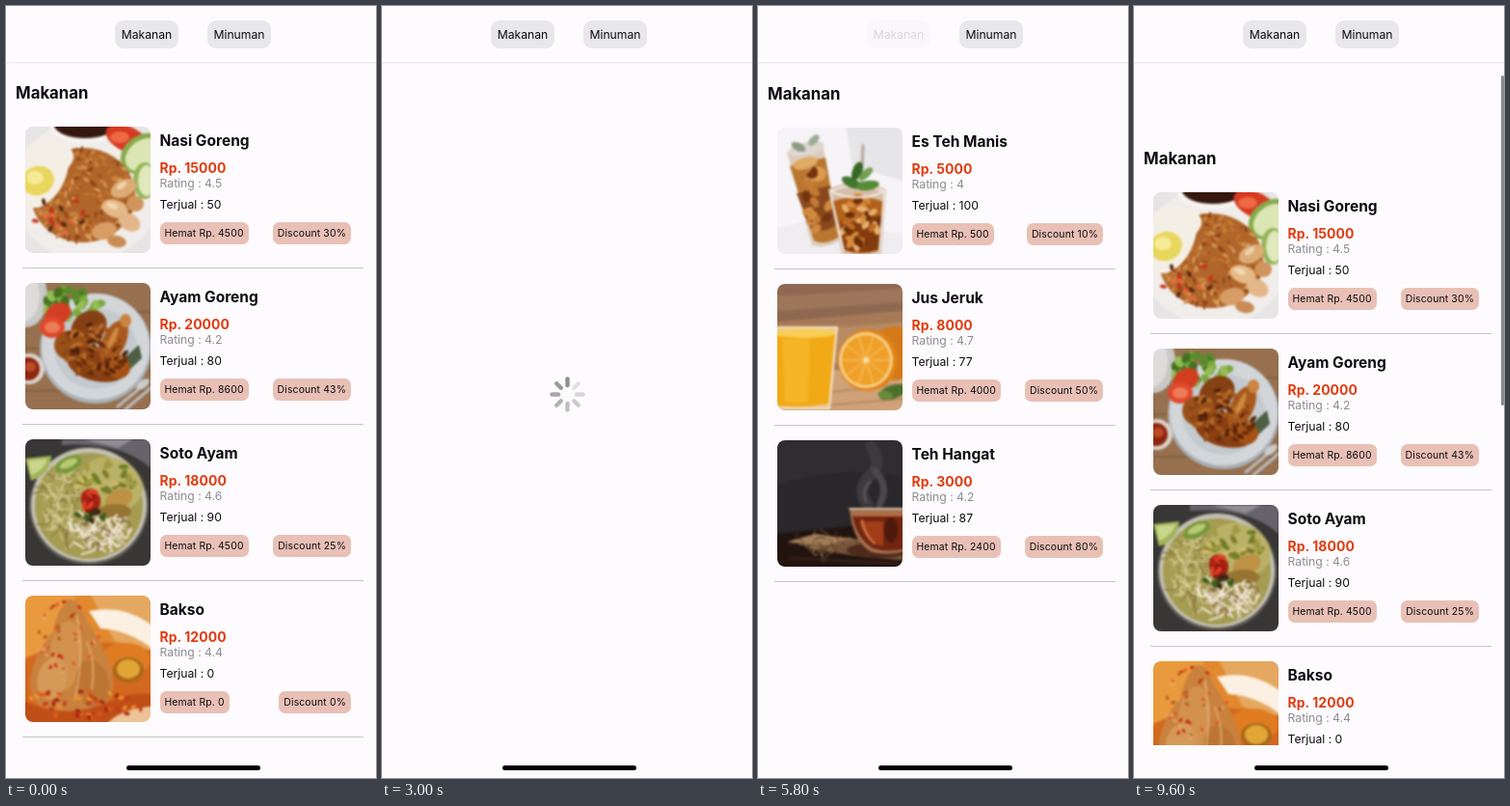
Animation, 384 px wide and 800 px high, one loop 9700 ms. Source, as an HTML page:

```html
<!DOCTYPE html>
<html lang="id">
<head>
<meta charset="utf-8">
<title>Menu</title>
<style>
  html, body { margin: 0; width: 100%; height: 100%; overflow: hidden; background: #fdfbfe; }
  #stage {
    position: relative; width: 384px; height: 800px; overflow: hidden;
    background: #fdfbfe; color: #0d0d0f;
    font: 12.2px/20px Inter, "Liberation Sans", sans-serif;
    font-optical-sizing: none; white-space: nowrap;
  }
  #stage * { position: absolute; }
  header { left: 0; top: 0; width: 384px; height: 58px; border-bottom: 1px solid #efedf0; box-shadow: 0 1px 1px #f4f3f5; }
  .tab { top: 14.5px; width: 66px; height: 29.5px; line-height: 29.5px; border-radius: 9px; background: #e8e7e9; text-align: center; }
  #food { left: 113px; }
  #drink { left: 209px; }
  #view { left: 0; top: 64px; width: 384px; height: 702px; overflow: hidden; }
  #title { left: 10px; top: 16px; font-size: 16.8px; font-weight: 700; }
  .list { left: 0; top: 0; width: 384px; }
  .row { left: 0; width: 384px; height: 162px; }
  .photo { left: 20px; top: 0; width: 130px; height: 131px; border-radius: 8px; overflow: hidden; }
  .photo g { filter: blur(.8px); }
  .row span { left: 159.5px; }
  .row .name { top: 5px; font-size: 15.5px; font-weight: 700; }
  .row .price { top: 33px; font-size: 13.9px; font-weight: 700; letter-spacing: .1px; color: #e03c10; }
  .row .rating { top: 49px; color: #8d8c90; }
  .row .sold { top: 71px; }
  .row .badge {
    top: 99px; height: 23px; line-height: 23px; padding: 0 5px; border-radius: 6.5px;
    background: #e9c0b6; font-size: 10.4px; letter-spacing: .15px;
  }
  .row .off { left: auto; right: 26px; }
  .row hr { left: 17px; top: 146px; width: 354px; height: 1px; margin: 0; border: 0; background: #c6c5c8; }
  #bar { left: 381px; width: 3px; border-radius: 2px; background: #8b8a8e; }
  #spin { left: 174px; top: 384px; width: 37px; height: 37px; }
  #home { left: 125px; top: 787px; width: 138.5px; height: 5px; border-radius: 3px; background: #000; }
</style>
</head>
<body>
<div id="stage">
  <header></header>
  <div class="tab" id="food">Makanan</div>
  <div class="tab" id="drink">Minuman</div>
  <div id="view">
    <div class="list" id="foods"></div>
    <div class="list" id="drinks"></div>
    <div id="title"></div>
  </div>
  <div id="bar"></div>
  <svg id="spin" viewBox="-18.5 -18.5 37 37"></svg>
  <div id="home"></div>
</div>
<script>
const $ = id => document.getElementById(id);
const LOOP = 9700, PITCH = 161.75, MAX_SCROLL = 476;

// Drawing helpers
let seed = 1;
const rnd = () => (seed = seed * 16807 % 2147483647) / 2147483647;
const fill = c => `<rect x="-9" y="-9" width="148" height="149" fill="${c}"/>`;
const oval = (x, y, rx, ry, c, rot = 0) =>
  `<ellipse cx="${x}" cy="${y}" rx="${rx}" ry="${ry}" fill="${c}" transform="rotate(${rot} ${x} ${y})"/>`;
const shape = (d, c) => `<path d="${d}" fill="${c}"/>`;
const line = (d, c, w = 1) => `<path d="${d}" fill="none" stroke="${c}" stroke-width="${w}" stroke-linecap="round"/>`;

function scatter(n, x, y, rx, ry, draw) {
  let out = '';
  for (let i = 0; i < n; i++) {
    const a = rnd() * 6.283, r = Math.sqrt(rnd());
    out += draw(x + Math.cos(a) * r * rx, y + Math.sin(a) * r * ry, i);
  }
  return out;
}
const bits = (n, x, y, rx, ry, w, h, colors) => scatter(n, x, y, rx, ry, (px, py, i) =>
  oval(px.toFixed(1), py.toFixed(1), w, h, colors[i % colors.length], Math.round(rnd() * 180)));
const strands = (n, x, y, rx, ry, len, colors, w) => scatter(n, x, y, rx, ry, (px, py, i) => {
  const j = () => ((rnd() - .5) * 2 * len).toFixed(1);
  return line(`M${px.toFixed(1)} ${py.toFixed(1)}q${j()} ${j()} ${j()} ${j()}`, colors[i % colors.length], w);
});

const photos = {
  friedRice: () => fill('#e6e4e5') +
    oval(64, 66, 78, 72, '#f1edea') +
    oval(62, 0, 37, 17, '#f7f3f0') + oval(62, -2, 32, 14, '#35170f') +
    oval(106, 13, 24, 13, '#d63a20', 25) + oval(98, 11, 10, 6, '#ee6a44') +
    oval(122, 28, 25, 19, '#86ab4b', -35) + oval(123, 29, 21, 15, '#dbe6b4', -35) +
    oval(124, 56, 12, 19, '#93b458') + oval(126, 56, 9, 16, '#e0e9bd') +
    oval(60, 71, 54, 49, '#b0662b') +
    bits(200, 60, 71, 53, 48, 3.4, 1.3, ['#d08a45', '#8d4115', '#c4762e', '#dca25e', '#a5521b']) +
    shape('M0 22Q20 8 44 20Q56 30 45 42Q38 74 14 84L-4 84Z', '#f4efe5') +
    oval(13, 56, 17, 15, '#e9d65c', -20) + oval(10, 53, 9, 7, '#f6ea96') +
    oval(102, 64, 14, 9, '#dcab76', -25) + oval(93, 85, 14, 9, '#e5ba89', 20) +
    oval(82, 108, 13, 9, '#d79d64', -15) + oval(108, 99, 12, 9, '#e3b78a', 30) +
    oval(114, 80, 9, 8, '#d0955c') + oval(95, 119, 10, 6, '#c98c55', 10) +
    oval(100, 61, 6, 3, '#f0d1ab', -35) + oval(90, 82, 6, 3, '#f3d8b6', 20) +
    bits(16, 36, 92, 30, 20, 3.5, 2, ['#c93318', '#5b2a12', '#e46b3c']),

  friedChicken: () => fill('#96704f') +
    line('M0 30H130M0 68H130M0 112H130', '#84603f', 2) +
    oval(1, 14, 22, 32, '#c9c8c6') + oval(-2, 13, 17, 27, '#dddcda') +
    oval(73, 68, 58, 57, '#aab0b5') + oval(73, 66, 56, 55, '#d2d6d9') + oval(73, 68, 43, 42, '#c3c9cd') +
    bits(40, 48, 21, 30, 14, 6, 4, ['#5b8a2c', '#7ba83c', '#44711f', '#94bd55']) +
    oval(34, 32, 14, 11, '#d33e22', -30) + oval(28, 46, 13, 11, '#e0492b') + oval(28, 46, 8, 6, '#ec7b57') +
    shape('M92 88L118 64L121 78L104 94Z', '#4c5f43') +
    oval(66, 46, 20, 16, '#854014', -40) + oval(48, 65, 18, 16, '#9a5019', 10) +
    oval(75, 84, 32, 18, '#8a3f11', 12) + oval(92, 61, 12, 24, '#a9591d', 25) +
    oval(104, 39, 6, 7, '#c98541') + oval(97, 88, 12, 11, '#a65217') +
    bits(90, 72, 70, 34, 27, 4, 2, ['#b86c2b', '#6a2c09', '#a3581d', '#8a4414', '#4f2008']) +
    oval(91, 57, 3, 12, '#cf8a42', 25) +
    oval(4, 89, 16, 16, '#dad2cb') + oval(3, 89, 12, 12, '#8f2812') + oval(5, 87, 6, 5, '#bc4a25') +
    line('M96 128L125 104M104 131L130 109', '#b9bbbc', 3) + oval(122, 105, 8, 4, '#c9cbcc', -38),

  soto: () => fill('#393735') +
    shape('M38 0H130V30Q100 2 38 6Z', '#66646a') + shape('M60 0H112L96 9Z', '#8f8d91') +
    oval(66, 69, 62, 61, '#5f5c55') + oval(66, 68, 60, 59, '#c2c0b3') + oval(66, 69, 56, 55, '#a59c52') +
    oval(90, 46, 33, 26, '#b9b166', 25) +
    strands(90, 39, 66, 24, 32, 13, ['#d0c88a', '#b5aa62', '#ddd3a2', '#8a7a3c'], 1.3) +
    bits(30, 82, 43, 32, 20, 5, 2.5, ['#6f7d28', '#a29a42', '#cdb965', '#7d7b2b']) +
    oval(97, 62, 15, 10, '#bd9245', -25) + oval(93, 75, 17, 8, '#967431') +
    strands(70, 78, 98, 35, 17, 14, ['#eee3d1', '#d0bf9f', '#f4ecde', '#8d7245'], 1.8) +
    oval(68, 63, 10, 12, '#a92315', -20) + bits(9, 69, 63, 10, 12, 5, 2.5, ['#dd3f25', '#8f160d']) +
    bits(12, 68, 79, 14, 5, 4, 2, ['#375a1c', '#3a2a16']) +
    shape('M0 20L27 17Q26 36 6 43Z', '#a0b556') + shape('M3 22L23 20Q20 32 6 37Z', '#c9d58b') +
    oval(45, 26, 15, 8, '#78973b', -25) + oval(45, 25, 10, 4, '#b9c974', -25),

  meatball: () => fill('#e2892f') +
    shape('M-9 -9H58L22 58L-9 70Z', '#e99a3d') + shape('M64 -9H140V64L92 46Z', '#e5a860') +
    shape('M66 16Q108 8 140 38V62Q112 36 78 34Z', '#fbf0e2') +
    shape('M0 65Q62 34 140 60V140H-9Z', '#d2691f') +
    oval(104, 66, 26, 17, '#df7c22') + oval(107, 77, 16, 13, '#a9681a') + oval(107, 76, 12, 10, '#e2a636') +
    shape('M45 4Q57 4 64 27Q84 52 91 84Q94 119 56 125Q12 128 5 95Q6 62 29 38Q32 15 45 4Z', '#c9823e') +
    oval(42, 62, 17, 36, '#d2924e', 6) + oval(70, 92, 17, 26, '#bd7534', -12) + oval(28, 86, 15, 22, '#d69a58', 14) +
    line('M53 18Q62 60 52 106M64 48Q74 72 69 97', '#dfae73', 1.5) +
    shape('M-9 105Q40 133 92 108Q118 96 140 106V140H-9Z', '#c04e17') +
    shape('M80 140Q92 116 140 114V140Z', '#eec39a') +
    bits(40, 43, 42, 34, 37, 2.4, 1.5, ['#c52c12', '#df5a24', '#b3571f', '#e6a561']) +
    bits(45, 62, 112, 62, 16, 3, 1.8, ['#d95c1c', '#a8250c', '#ef9130', '#c43a14']),

  satay: () => fill('#3f543c') +
    [...Array(24)].map((_, i) => line(`M${i * 11 - 125} 135L${i * 11 - 10} -5`, i % 2 ? '#5d7451' : '#2a3f2b', i % 3 + 1.5)).join('') +
    shape('M-9 98Q30 115 46 140H-9Z', '#d2d4d2') + shape('M100 -9H140V26Z', '#78906a') +
    line('M74 72L130 86M70 79L130 98M63 86L125 113M50 94L105 124M43 99L80 126', '#bfa06a', 2) +
    oval(52, 57, 45, 24, '#5f2b1c', 13) + oval(62, 41, 36, 20, '#6c3421', 18) +
    oval(38, 76, 29, 17, '#522519', 12) + oval(85, 68, 25, 13, '#693120', 12) +
    bits(220, 58, 57, 47, 31, 2.8, 1.8, ['#94513a', '#42190f', '#7a3724', '#b0745a', '#612819']) +
    oval(31, 96, 12, 6, '#8a7a42', 15) + oval(68, 95, 11, 6, '#998046', 12),

  noodles: () => fill('#eeeae7') +
    line('M66 120V131', '#c08a60', 25) + oval(65, 64, 65, 65, '#b08a6c') +
    oval(65, 62, 63, 62, '#857362') + oval(65, 64, 57, 57, '#63493a') + oval(66, 68, 53, 52, '#7c431c') +
    strands(210, 66, 67, 49, 47, 17, ['#b26c2d', '#693211', '#cb9049', '#985420', '#4a2410'], 1.6) +
    bits(60, 66, 68, 47, 45, 3.5, 2.2, ['#1f3522', '#d7aa6a', '#3b1d0d', '#c58945']) +
    oval(30, 87, 12, 5, '#20391f', 30) + oval(75, 98, 14, 6, '#263e28', -8) +
    oval(94, 49, 10, 5, '#243c25', -48) + oval(53, 43, 9, 4, '#2c472b', 45) +
    shape('M49 126H82L87 140H44Z', '#d2a27e') + line('M53 129H77', '#6d4b37', 3),

  icedTea: () => fill('#f6f4f6') +
    shape('M70 -9H140V58L78 40Z', '#e6e5e8') + shape('M-9 106L40 95L140 112V140H-9Z', '#efedef') +
    shape('M10 25L47 17L66 116Q53 126 36 122Z', '#dccbbc') +
    shape('M13 40L50 31L64 113Q50 123 38 117Z', '#b9762f') +
    shape('M20 68L55 60L62 100Q48 112 34 103Z', '#8a491d') +
    oval(29, 37, 13, 6, '#e1aa65', -15) + oval(41, 48, 10, 8, '#dc9c50') + oval(30, 22, 19, 7, '#ded7cf', -12) +
    bits(16, 42, 75, 14, 32, 6, 4, ['#d08a40', '#74340f', '#c47a33']) +
    oval(22, 20, 8, 4, '#8a9c84', 25) + oval(38, 13, 7, 4, '#9cad95', -45) +
    shape('M53 64Q82 50 113 64L108 131H67Z', '#d6bda7') +
    shape('M56 77Q83 67 111 77L106 127Q87 134 69 127Z', '#b2611c') +
    shape('M65 97L108 91L105 126Q87 132 70 126Z', '#823a0e') +
    bits(40, 85, 97, 20, 27, 5, 3, ['#d68b3b', '#6c2d0b', '#bd6c25', '#e7b06d']) +
    line('M55 66Q83 54 111 66Q84 79 55 66M55 68L69 128M111 68L106 128', '#efe7e1', 2) +
    line('M89 19L87 59', '#b9a798', 3) +
    oval(77, 57, 11, 5, '#41762e', 25) + oval(94, 60, 12, 5, '#568c38', -8) +
    oval(83, 45, 5, 10, '#386924', 22) + oval(92, 48, 4, 9, '#71a050', 48),

  orangeJuice: () => fill('#a77a57') +
    shape('M-9 -9H140V27L-9 40Z', '#8e6850') + shape('M-9 13L140 4V18L-9 29Z', '#9d765c') +
    shape('M-9 50L140 39V74L-9 90Z', '#b88a64') + shape('M-9 94L140 84V140H-9Z', '#d0a27a') +
    line('M58 112L130 104M50 126L130 119', '#b88a62', 2) +
    oval(121, 72, 25, 28, '#d37918') +
    oval(94, 79, 31, 32, '#df8415') + oval(92, 79, 28, 29, '#f7d18b') + oval(92, 79, 25, 26, '#efa029') +
    [...Array(10)].map((_, i) => line(`M92 79L${92 + 24 * Math.cos(i * .628)} ${79 + 25 * Math.sin(i * .628)}`, '#f9cb70', 1)).join('') +
    oval(92, 79, 3, 3, '#fae0a7') +
    oval(120, 112, 15, 7, '#4c702c', -18) + oval(112, 115, 8, 4, '#6c8b3c', 10) +
    shape('M-4 44H62L54 129H-4Z', '#e7c596') + shape('M-4 52Q30 47 60 52L53 124Q28 129 -4 126Z', '#f1a915') +
    shape('M5 57H34L32 123H8Z', '#f5b526') + oval(28, 51, 33, 5, '#f9ce59') +
    line('M0 45H62L54 129H0', '#f5e2c3', 2),

  hotTea: () => fill('#292729') +
    shape('M-9 -9H140V42Q82 22 -9 48Z', '#2f2d31') + shape('M-9 98L140 82V140H-9Z', '#21140f') +
    line('M94 67Q81 49 98 35Q109 23 97 6', '#3c3a3d', 12) + line('M106 67Q117 48 101 31', '#49474a', 7) +
    line('M92 63Q87 53 96 43', '#565457', 3) +
    shape('M11 105L38 98L76 101L140 112V125L88 121L45 114Z', '#735238') +
    shape('M11 105L40 97L77 103L48 109Z', '#a58058') +
    strands(35, 56, 109, 38, 7, 12, ['#9c7b56', '#523523', '#8b6746'], 1) +
    oval(105, 114, 33, 8, '#4d2a1b') +
    shape('M75 71H140V112Q121 121 98 116Q78 105 75 71Z', '#a4704e') +
    shape('M78 78H140V110Q118 118 99 112Q82 101 78 78Z', '#722511') +
    shape('M85 84H110V110Q91 105 85 84Z', '#a33d17') +
    line('M75 71H131', '#d3bba4', 2) + line('M80 78H131', '#bd6838', 2) +
    line('M88 83Q91 99 101 107', '#d28151', 2) + oval(118, 93, 7, 13, '#4e180d') +
    line('M12 122L130 128', '#3c2317', 2)
};

// name, price, rating, sold, saving, discount, photo
const foods = [
  ['Nasi Goreng', 15000, 4.5, 50, 4500, 30, 'friedRice'],
  ['Ayam Goreng', 20000, 4.2, 80, 8600, 43, 'friedChicken'],
  ['Soto Ayam', 18000, 4.6, 90, 4500, 25, 'soto'],
  ['Bakso', 12000, 4.4, 0, 0, 0, 'meatball'],
  ['Sate Ayam', 15000, 4.3, 105, 2250, 15, 'satay'],
  ['Mie Goreng', 13000, 4.1, 66, 4550, 35, 'noodles'],
  ['Nasi Kuning', 17000, 4.8, 53, 7650, 45, 'icedTea']
];
const drinks = [
  ['Es Teh Manis', 5000, 4, 100, 500, 10, 'icedTea'],
  ['Jus Jeruk', 8000, 4.7, 77, 4000, 50, 'orangeJuice'],
  ['Teh Hangat', 3000, 4.2, 87, 2400, 80, 'hotTea']
];

function row([name, price, rating, sold, save, off, photo], i) {
  seed = 4711;
  return `<div class="row" style="top:${61.4 + i * PITCH}px">
    <svg class="photo" viewBox="0 0 130 131"><g>${photos[photo]()}</g></svg>
    <span class="name">${name}</span><span class="price">Rp. ${price}</span>
    <span class="rating">Rating : ${rating}</span><span class="sold">Terjual : ${sold}</span>
    <span class="badge">Hemat Rp. ${save}</span><span class="badge off">Discount ${off}%</span><hr></div>`;
}
$('foods').innerHTML = foods.map(row).join('');
$('drinks').innerHTML = drinks.map(row).join('');
$('spin').innerHTML = [...Array(8)].map((_, i) =>
  `<line y1="-9.5" y2="-16" stroke="#8e8e93" stroke-width="4.4" stroke-linecap="round" transform="rotate(${i * 45})"/>`).join('');
const spokes = [...$('spin').children];
const foodPics = [...$('foods').querySelectorAll('.photo')];
const drinkPics = [...$('drinks').querySelectorAll('.photo')];

// Eased interpolation through [time, value] stops
function track(stops, t) {
  const k = stops.findIndex(s => s[0] > t);
  if (k < 0) return stops[stops.length - 1][1];
  if (k === 0) return stops[0][1];
  const [t0, a] = stops[k - 1], [t1, b] = stops[k];
  return a + (b - a) * (1 - Math.cos(Math.PI * (t - t0) / (t1 - t0))) / 2;
}
const scrollStops = [
  [4300, 0], [4700, -80], [5100, 0], [5400, 70], [5800, 1], [5900, 0],
  [8100, 0], [8800, -535], [8900, -526], [9000, -490], [9600, 68]
];
const pressDrink = [[1600, 1], [1800, .2], [2000, 1]];
const pressFood = [[5600, 1], [5800, .15], [6000, 1]];
const show = (el, on) => { el.style.visibility = on ? 'inherit' : 'hidden'; };
const move = (el, y) => { el.style.transform = `translateY(${y}px)`; };

function render(t) {
  const loading = (t >= 2000 && t < 4000) || (t >= 5900 && t < 7800);
  const onDrinks = t >= 4000 && t < 5900;
  const y = Math.round(track(scrollStops, t));

  $('drink').style.opacity = track(pressDrink, t);
  $('food').style.opacity = track(pressFood, t);

  show($('view'), !loading);
  show($('foods'), !loading && !onDrinks);
  show($('drinks'), !loading && onDrinks);
  show(drinkPics[0], t >= 4300);
  for (const i of [0, 2]) show(foodPics[i], t < 2000 || t >= 8000);

  // The heading stays pinned but follows the pull-down bounce
  $('title').textContent = t >= 1900 && t < 5800 ? 'Minuman' : 'Makanan';
  move($('title'), Math.max(0, y));
  move($('foods'), y);
  move($('drinks'), y);

  const over = Math.max(0, y, -y - MAX_SCROLL);
  const part = Math.min(1, Math.max(0, -y / MAX_SCROLL));
  const size = 410 - over;
  $('bar').style.opacity = track([[8100, 0], [8300, 1]], t);
  $('bar').style.top = 72 + part * (691 - size) + 'px';
  $('bar').style.height = size + 'px';

  show($('spin'), loading);
  const step = Math.floor(t / 125);
  spokes.forEach((s, i) => s.setAttribute('opacity', 1 - ((step - i) % 8 + 8) % 8 * .11));
}

function tick() {
  const t = performance.now() % LOOP;
  render(t - t % 100);
  requestAnimationFrame(tick);
}
tick();
</script>
</body>
</html>
```
